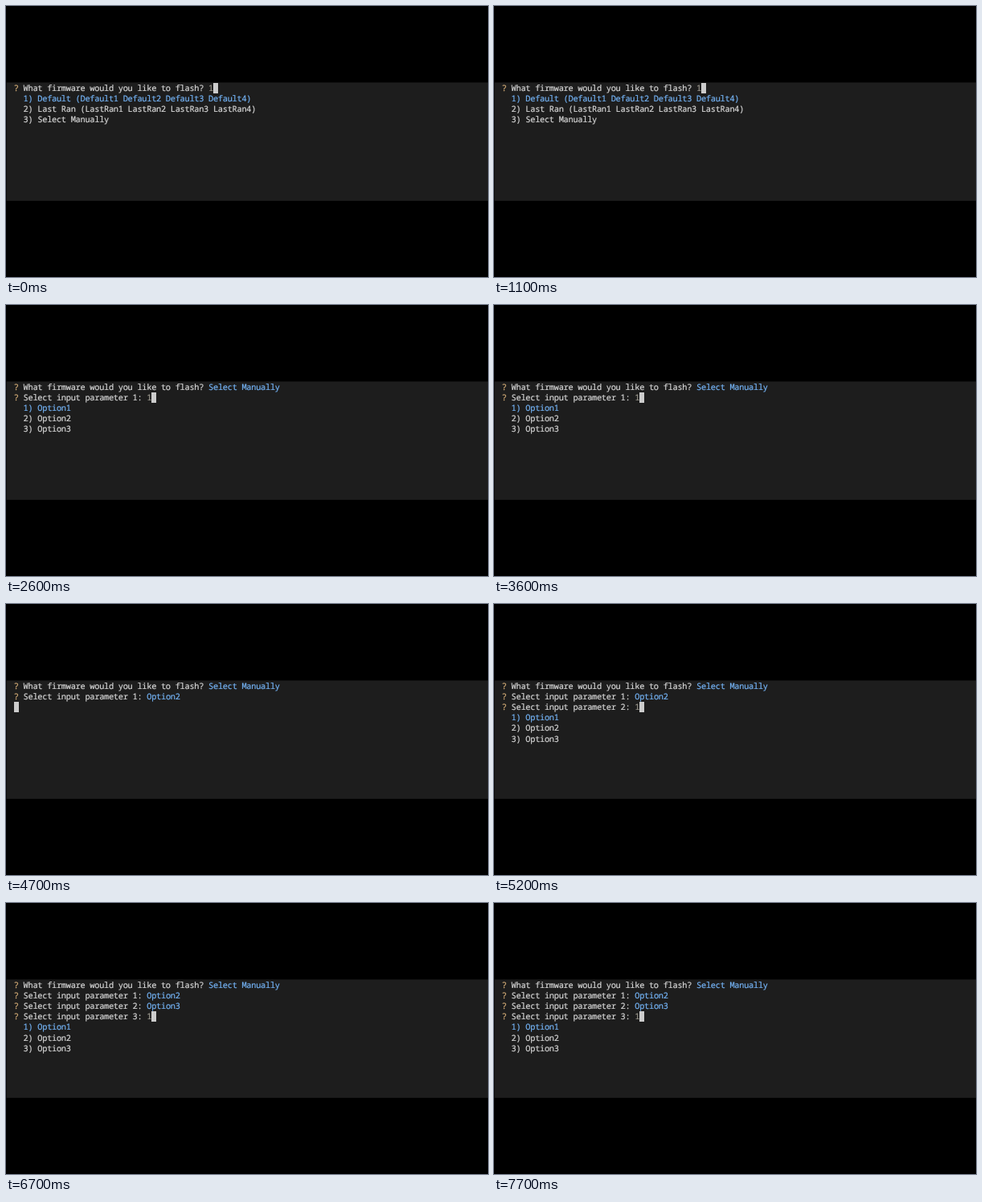
Recreate the animation shown at these times as an HTML page. Size 600 by 338 pixels, loop 8 s.

```html
<!DOCTYPE html>
<html lang="en">
<head>
<meta charset="utf-8">
<style>
  html, body { margin: 0; width: 100%; height: 100%; overflow: hidden; background: #000; }
  svg { display: block; width: 600px; height: 338px; }
  text {
    font: 500 10.3px "Noto Sans Mono", "DejaVu Sans Mono", monospace;
    letter-spacing: -0.27px;
    text-rendering: geometricPrecision;
    white-space: pre;
    stroke-width: 0.2px;
  }
</style>
</head>
<body>
<svg viewBox="0 0 600 338">
  <rect x="0.7" y="95.4" width="600" height="147.6" fill="#1d1d1d"/>
  <g id="screen"></g>
</svg>
<script>
const LOOP = 8000, LEFT = 9.8, TOP = 95.6, CELL = 5.91, ROW = 13.2;
const WHITE = '#d6d6d6', BLUE = '#74b3f5', MARK = '#d6ae78', DIM = '#99958c';

const firmware = {
  ask: 'What firmware would you like to flash?',
  options: [
    'Default (Default1 Default2 Default3 Default4)',
    'Last Ran (LastRan1 LastRan2 LastRan3 LastRan4)',
    'Select Manually'
  ]
};
const parameter = n => ({
  ask: `Select input parameter ${n}:`,
  options: ['Option1', 'Option2', 'Option3']
});
const questions = [firmware, parameter(1), parameter(2), parameter(3)];
const answers = ['Select Manually', 'Option2', 'Option3'];

// [start ms, answered questions, highlighted option; 0 = waiting for the next menu]
const steps = [
  [0, 0, 1], [1300, 0, 2], [2000, 0, 3],
  [2600, 1, 1], [3800, 1, 2], [4700, 2, 0],
  [4800, 2, 1], [5700, 2, 2], [6100, 2, 3],
  [6700, 3, 1]
];

const screen = document.getElementById('screen');
const left = col => LEFT + col * CELL;
const top_ = row => TOP + row * ROW;

const write = (row, col, text, color) =>
  `<text x="${left(col)}" y="${top_(row) + 9.9}" fill="${color}" stroke="${color}">${text}</text>`;

const cursor = (row, col) =>
  `<rect x="${Math.round(left(col))}" y="${Math.round(top_(row))}" width="6" height="13" fill="#cccccc"/>`;

const prompt = (row, reply, color) =>
  write(row, 0, '?', MARK) +
  write(row, 2, questions[row].ask, WHITE) +
  write(row, questions[row].ask.length + 3, reply, color);

function render([, done, choice]) {
  let out = answers.slice(0, done).map((reply, row) => prompt(row, reply, BLUE)).join('');
  if (!choice) return out + cursor(done, 0);
  const { ask, options } = questions[done];
  out += prompt(done, choice, DIM) + cursor(done, ask.length + 4);
  options.forEach((option, i) => {
    out += write(done + 1 + i, 2, `${i + 1}) ${option}`, i + 1 === choice ? BLUE : WHITE);
  });
  return out;
}

let shown;
const start = performance.now();
function tick() {
  const t = (performance.now() - start) % LOOP;
  const step = steps.findLast(s => s[0] <= t);
  if (step !== shown) screen.innerHTML = render(shown = step);
  requestAnimationFrame(tick);
}
tick();
</script>
</body>
</html>
```
